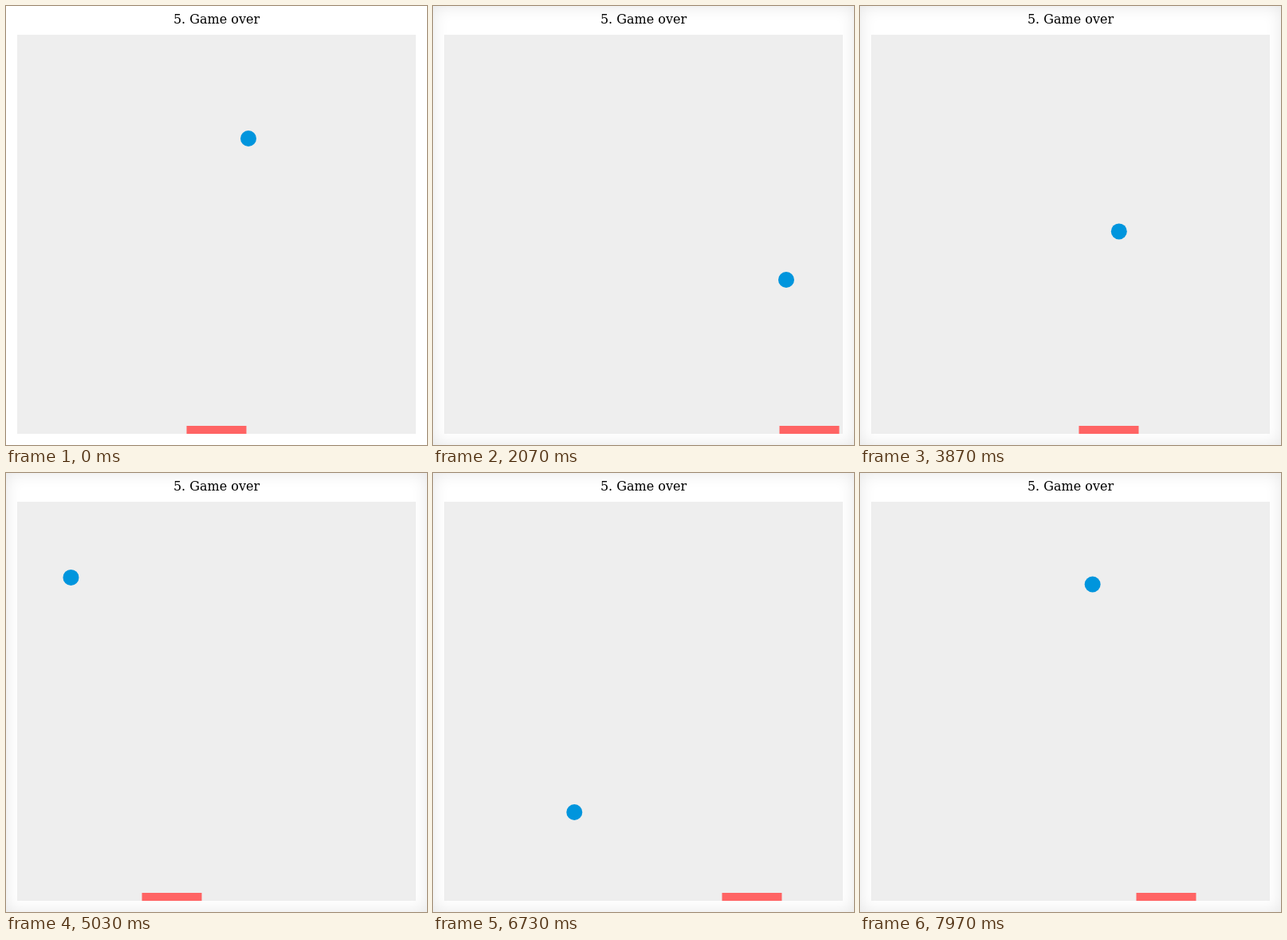
Write an HTML page with a canvas that moves like this. It is 528x550 px and loops after 8 s.

```html
<!DOCTYPE html>
<html lang="en">
<head>
<meta charset="utf-8">
<title>Game over</title>
<style>
  html, body { margin: 0; width: 100%; height: 100%; overflow: hidden; background: #fff; }
  #stage { position: relative; width: 100%; height: 100%; }
  #stage.glow { box-shadow: inset 0 0 20px rgba(0, 0, 0, .1); }
  h1 { position: absolute; top: 7px; width: 528px; margin: 0; text-align: center;
       font: 16px/19px "DejaVu Serif", serif; color: #000; }
  canvas { position: absolute; left: 14px; top: 36px; background: #eee; }
</style>
</head>
<body>
<div id="stage">
  <h1>5. Game over</h1>
  <canvas width="500" height="500"></canvas>
</div>
<script>
const SIZE = 500, FRAMES = 240, FRAME = 1000 / 30;
const STEP = 14.87;               // duration of one game step in ms
const RADIUS = 10, OVERSHOOT = 3; // the ball may run past the right wall a little
const PADDLE_W = 75, PADDLE_H = 10, PADDLE_SPEED = 8;
const stage = document.getElementById('stage');
const ctx = document.querySelector('canvas').getContext('2d');

// Each paddle hit starts a new leg with a faster ball; speeds are per step
const legs = [
  { start: 0, x: 290, y: 130, vx: 1, vy: -3 },
  { start: 3000, x: 491.1, y: 489.5, vx: 3.12, vy: -4.12 },
  { start: 6470, x: 254.6, y: 491.5, vx: -5.072, vy: -5.693 }
];

// Key presses: each drives the paddle to an offset from the centre
const presses = [
  { start: 1360, to: 208 }, { start: 3480, to: 48 }, { start: 4850, to: -80 },
  { start: 6320, to: 136 }, { start: 7000, to: 40 }, { start: 7820, to: 120 }
];

const stepsSince = (start, time) => Math.max(0, Math.ceil((time - start) / STEP));

// Reflects a straight run between two walls
function bounce(value, low, high) {
  const span = high - low;
  const phase = (((value - low) % (2 * span)) + 2 * span) % (2 * span);
  return low + span - Math.abs(span - phase);
}

function ballAt(time) {
  const leg = legs.filter(l => l.start <= time).pop();
  const n = stepsSince(leg.start, time);
  return [
    bounce(leg.x + leg.vx * n, RADIUS, SIZE - RADIUS + OVERSHOOT),
    bounce(leg.y + leg.vy * n, RADIUS, SIZE - RADIUS)
  ];
}

function paddleAt(time) {
  return presses.reduce((offset, { start, to }) => {
    const reach = PADDLE_SPEED * stepsSince(start, time);
    return offset + Math.max(-reach, Math.min(reach, to - offset));
  }, (SIZE - PADDLE_W) / 2 * 0);
}

function draw(now) {
  const frame = Math.floor((now + 4) / FRAME) % FRAMES;
  const time = frame * FRAME;
  stage.classList.toggle('glow', frame > 0);
  ctx.clearRect(0, 0, SIZE, SIZE);

  ctx.fillStyle = '#0095dd';
  ctx.beginPath();
  ctx.arc(...ballAt(time), RADIUS, 0, Math.PI * 2);
  ctx.fill();

  ctx.fillStyle = '#ff6464';
  ctx.fillRect((SIZE - PADDLE_W) / 2 + paddleAt(time), SIZE - PADDLE_H, PADDLE_W, PADDLE_H);
}

const start = performance.now();
function tick() {
  draw(performance.now() - start);
  requestAnimationFrame(tick);
}
tick();
</script>
</body>
</html>
```
